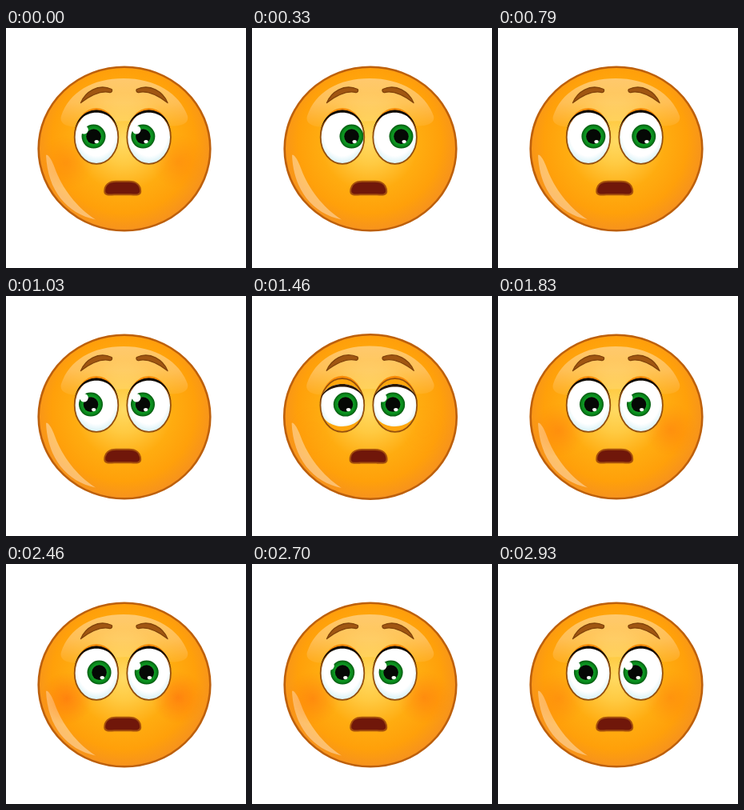
Write an HTML page that moves like this. It is 300x300 px and loops after 2960 ms.

```html
<!DOCTYPE html>
<html lang="en">
<head>
<meta charset="utf-8">
<title>Flushed face</title>
<style>
html, body { margin: 0; height: 100%; overflow: hidden; background: #fff; }
svg { display: block; width: 100vw; height: 100vh; }
</style>
</head>
<body>
<svg viewBox="0 0 300 300">
  <defs>
    <radialGradient id="skin" gradientUnits="userSpaceOnUse" cx="147" cy="142" r="112">
      <stop offset="0" stop-color="#ffda62"/>
      <stop offset=".25" stop-color="#ffca42"/>
      <stop offset=".55" stop-color="#ffac10"/>
      <stop offset=".8" stop-color="#ffa00a"/>
      <stop offset="1" stop-color="#f6921e"/>
    </radialGradient>
    <linearGradient id="shine" x2="0" y2="1">
      <stop offset="0" stop-color="#fff" stop-opacity=".4"/>
      <stop offset=".5" stop-color="#fff" stop-opacity=".3"/>
      <stop offset="1" stop-color="#fff" stop-opacity=".06"/>
    </linearGradient>
    <radialGradient id="blush">
      <stop offset="0" stop-color="#ff5f10" stop-opacity=".5"/>
      <stop offset=".45" stop-color="#ff6a10" stop-opacity=".32"/>
      <stop offset="1" stop-color="#ff7810" stop-opacity="0"/>
    </radialGradient>
    <radialGradient id="white" cy=".42" r=".6">
      <stop offset=".7" stop-color="#fff"/>
      <stop offset="1" stop-color="#cdeef6"/>
    </radialGradient>
    <radialGradient id="green">
      <stop offset=".5" stop-color="#19a52b"/>
      <stop offset=".82" stop-color="#088a1c"/>
      <stop offset="1" stop-color="#04570f"/>
    </radialGradient>
    <clipPath id="eyeClip"><ellipse rx="27.3" ry="33.2"/></clipPath>
    <path id="brow" d="M93.5 93.5C99 80 115 69 132 76.5C133.5 78.5 132 81 129.5 80.5C118 78 106 84 93.5 93.5Z"
      fill="#a05612" stroke="#81430a" stroke-width="1.3" stroke-linejoin="round"/>
  </defs>
  <g id="face">
    <ellipse cx="148" cy="151" rx="107.3" ry="102.3" fill="url(#skin)" stroke="#bd600c" stroke-width="2.6"/>
    <path d="M69 110C79 80 108 63 147 63C187 63 217 82 227 110C230 124 207 124 190 121C160 114 130 115 105 122C88 126 65 124 69 110Z" fill="url(#shine)"/>
    <path d="M50 159C52 203 76 232 112 239.5C88 224 70 200 61 175C58 166 52 156 50 159Z" fill="#fff" opacity=".38"/>
    <g id="cheeks">
      <circle cx="76" cy="168" r="33" fill="url(#blush)"/>
      <circle cx="215" cy="167" r="33" fill="url(#blush)"/>
    </g>
    <use href="#brow"/>
    <use href="#brow" transform="matrix(-1 0 0 1 295.5 0)"/>
    <g id="eyes"></g>
    <path id="mouth" d="M-22.5 4C-22.5 -4 -17 -8.5 -8 -8.5H8C17 -8.5 22.5 -4 22.5 4C22.5 9 17 8.5 10 8H-10C-17 8.5 -22.5 9 -22.5 4Z"
      fill="#70170a" stroke="#a5500c" stroke-width="2"/>
  </g>
</svg>
<script>
const LOOP = 2960;
const $ = id => document.getElementById(id);
const clamp = x => Math.min(1, Math.max(0, x));
const mix = (a, b, k) => a + (b - a) * k;

// Linear value along [time, value] keys
function track(keys, t) {
  for (let i = 1; i < keys.length; i++) {
    const [t0, a] = keys[i - 1], [t1, b] = keys[i];
    if (t <= t1) return mix(a, b, clamp((t - t0) / (t1 - t0)));
  }
  return keys[keys.length - 1][1];
}

const gaze = (start, right, left) => [
  [0, start], [330, right], [700, right], [1030, left],
  [1160, left], [1230, 0], [2430, 0], [LOOP, start]
];
const blink = [[1430, 0], [1560, 1], [1700, 1], [1830, 0]];
const swelling = [[1430, 0], [1630, 1], [1830, 0]];
const blushing = [[0, .5], [330, 0], [1430, 0], [2060, 1], [2430, 1], [LOOP, .5]];

const eyes = [
  { x: 113, rest: 4, look: gaze(-7.5, 7.5, -11) },
  { x: 178.6, rest: -2.6, look: gaze(-4.7, 10.5, -5) }
];

for (const eye of eyes) {
  $("eyes").insertAdjacentHTML("beforeend", `
    <g transform="translate(${eye.x} 136.6)">
      <ellipse cy="-3.6" rx="26.5" ry="33" fill="#fa8c08"/>
      <g clip-path="url(#eyeClip)">
        <ellipse rx="28" ry="34" fill="url(#white)"/>
        <g class="iris">
          <circle r="15" fill="url(#green)"/>
          <circle r="9.3" fill="#050805"/>
          <ellipse cx="3.7" cy="6.5" rx="2.7" ry="2.1" fill="#fff"/>
        </g>
        <circle cx="-15.5" cy="-9.3" r="5.3" fill="#fff"/>
        <path class="lower" fill="#ffa60c"/>
        <path class="upper" fill="#ffa60c"/>
      </g>
      <ellipse rx="27.3" ry="33.2" fill="none" stroke="#95500d" stroke-width="1.8"/>
      <path class="lash"/>
    </g>`);
  const group = $("eyes").lastElementChild;
  for (const name of ["iris", "lower", "upper", "lash"]) eye[name] = group.querySelector("." + name);
}

// Arc across the eye, bent towards height mid
const arc = mid => `M-28 0C-28 ${mid} 28 ${mid} 28 0`;

function draw(now) {
  const t = now % LOOP;
  const shut = track(blink, t);
  const swell = track(swelling, t);

  $("face").setAttribute("transform", `translate(148 151) scale(${1 + .028 * swell}) translate(-148 -151)`);
  $("mouth").setAttribute("transform", `translate(${145.7 - .6 * swell} 200.3) scale(${1 + .1 * swell} ${1 + .04 * swell})`);
  $("cheeks").setAttribute("opacity", track(blushing, t));

  const top = mix(-45.5, -2.5, shut);
  const bottom = mix(46, 0, shut);
  const ink = `rgb(${mix(12, 130, shut)},${mix(8, 64, shut)},4)`;
  for (const eye of eyes) {
    eye.iris.setAttribute("transform", `translate(${eye.rest + track(eye.look, t)} -1)`);
    eye.upper.setAttribute("d", arc(top) + "V-40H-28Z");
    eye.lower.setAttribute("d", arc(bottom) + "V40H-28Z");
    eye.lash.setAttribute("d", `${arc(top)}C28 ${top + 4.5} -28 ${top + 4.5} -28 0Z`);
    eye.lash.setAttribute("fill", ink);
  }
}

const begin = performance.now();
function tick() {
  draw(performance.now() - begin);
  requestAnimationFrame(tick);
}
tick();
</script>
</body>
</html>
```
